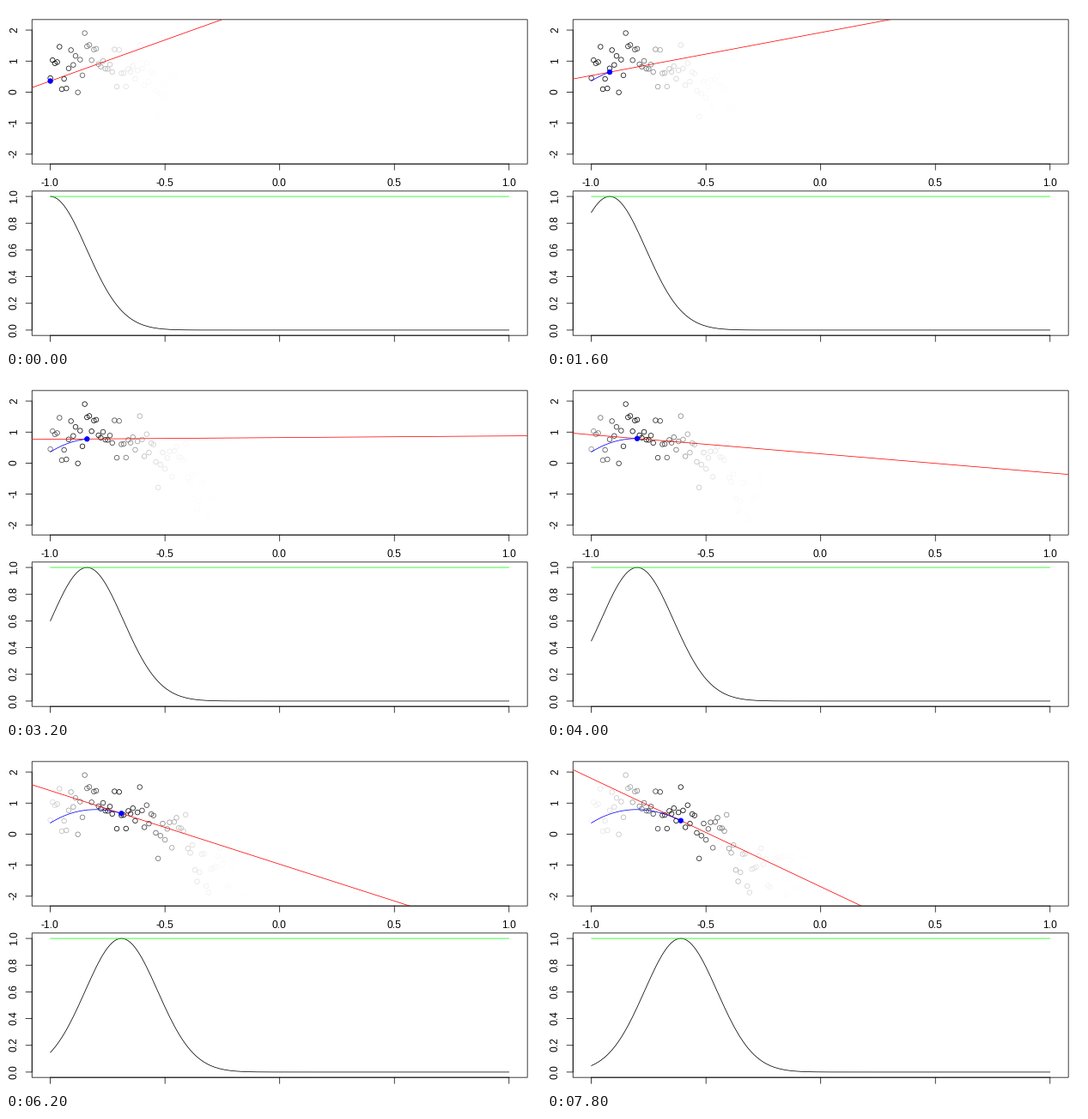
A matplotlib script that plays this animation: 623x400 px, repeating every 8000 ms.

```python
"""Local linear regression sliding along a noisy series, with its Gaussian kernel."""
import numpy as np
import matplotlib.pyplot as plt
from matplotlib.animation import FuncAnimation
from matplotlib.patches import Circle, Rectangle

W, H, DPI = 623, 400, 100
PX = 72 / DPI                      # one pixel in points
LEFT, RIGHT = 30.24, 607.16
TOP_PANEL, LOW_PANEL = (15.84, 184.16), (215.84, 384.16)
LINE, RADIUS = 0.75, 2.75
STEPS, INTERVAL = 40, 200


def sx(x):
    return 318.7 + 267.09 * np.asarray(x)


def sy(y):
    return 100.45 - 36.2 * np.asarray(y)


def sw(w):
    return 377.93 - 155.86 * np.asarray(w)


def kernel(x, x0):
    return np.exp(-20 * (x - x0) ** 2)


def smooth(keys, values, x):
    """Polynomial through a few key points."""
    return np.polyval(np.polyfit(keys, values, len(keys) - 1), x)


# noisy wave
grid = np.linspace(-1, 1, 201)
rng = np.random.default_rng(12)
sample = 1.1 * np.cos(5.3 * (grid + 0.79)) - 0.03 + rng.normal(0, 0.5, grid.size)
sample = np.clip(sample, -2.15, 2.165)

# height and tilt of the local fit at each step
centres = -1 + 0.01 * np.arange(STEPS)
fit_x = sx(centres)
fit_y = smooth([-1, -0.92, -0.8, -0.69, -0.61], [87.5, 77.1, 71.8, 76.3, 84.7],
               centres)
slope = smooth([-1, -0.84, -0.74, -0.61], [-0.3587, -0.0073, 0.2161, 0.473],
               centres)

fig = plt.figure(figsize=(W / 100, H / 100), dpi=DPI, facecolor="white")
ax = fig.add_axes([0, 0, 1, 1])
ax.set_xlim(0, W)
ax.set_ylim(H, 0)
ax.axis("off")


def stroke(x, y, color="black", z=2):
    return ax.plot(x, y, color=color, lw=LINE * PX, zorder=z, snap=False,
                   solid_capstyle="round")[0]


def frame(top, bottom):
    return Rectangle((LEFT, top), RIGHT - LEFT, bottom - top, fill=False,
                     ec="black", lw=LINE * PX, snap=False, zorder=1)


def label(x, y, text, angle=0):
    ax.text(x, y, text, family="Liberation Sans", fontsize=12 * PX,
            rotation=angle, rotation_mode="anchor", ha="center", va="baseline")


def panel(top, bottom, ticks, to_px, fmt):
    ax.add_patch(frame(top, bottom))
    x_ticks = np.linspace(-1, 1, 5)
    stroke(sx([-1, 1]), [bottom] * 2)
    stroke([LEFT] * 2, to_px([ticks[0], ticks[-1]]))
    for v in x_ticks:
        stroke([sx(v)] * 2, [bottom, bottom + 7.2])
        label(sx(v) - 0.5, bottom + 25.9, f"{v:.1f}")
    for v in ticks:
        stroke([LEFT - 7.2, LEFT], [to_px(v)] * 2)
        label(12.96, to_px(v) - 0.8, format(v, fmt), 90)


panel(*TOP_PANEL, range(-2, 3), sy, "d")
panel(*LOW_PANEL, np.arange(6) / 5, sw, ".1f")

dots = ax.scatter(sx(grid), sy(sample), s=(2 * RADIUS * PX) ** 2,
                  facecolors="none", edgecolors="white",
                  linewidths=LINE * PX, zorder=2)
tangent = stroke([], [], "red", 3)
clip = frame(*TOP_PANEL)
clip.set_transform(ax.transData)
tangent.set_clip_path(clip)
trail = stroke([], [], "blue", 4)
marker = ax.add_patch(Circle((0, 0), RADIUS, fc="blue", ec="blue",
                             lw=LINE * PX, zorder=5))
bell = stroke([], [])
stroke(sx([-1, 1]), sw([1, 1]), "#00ff00", 3)


def draw(k):
    x0, px, py = centres[k], fit_x[k], fit_y[k]
    shade = 1 - kernel(grid, x0)
    dots.set_edgecolors(np.column_stack([shade] * 3))
    ends = np.array([LEFT, RIGHT])
    tangent.set_data(ends, py + slope[k] * (ends - px))
    trail.set_data(fit_x[:k + 1], fit_y[:k + 1])
    marker.center = px, py
    bell.set_data(sx(grid), sw(kernel(grid, x0)))
    return dots, tangent, trail, marker, bell


anim = FuncAnimation(fig, draw, frames=STEPS, interval=INTERVAL,
                     repeat=True, repeat_delay=0, blit=False)
plt.show()
```
